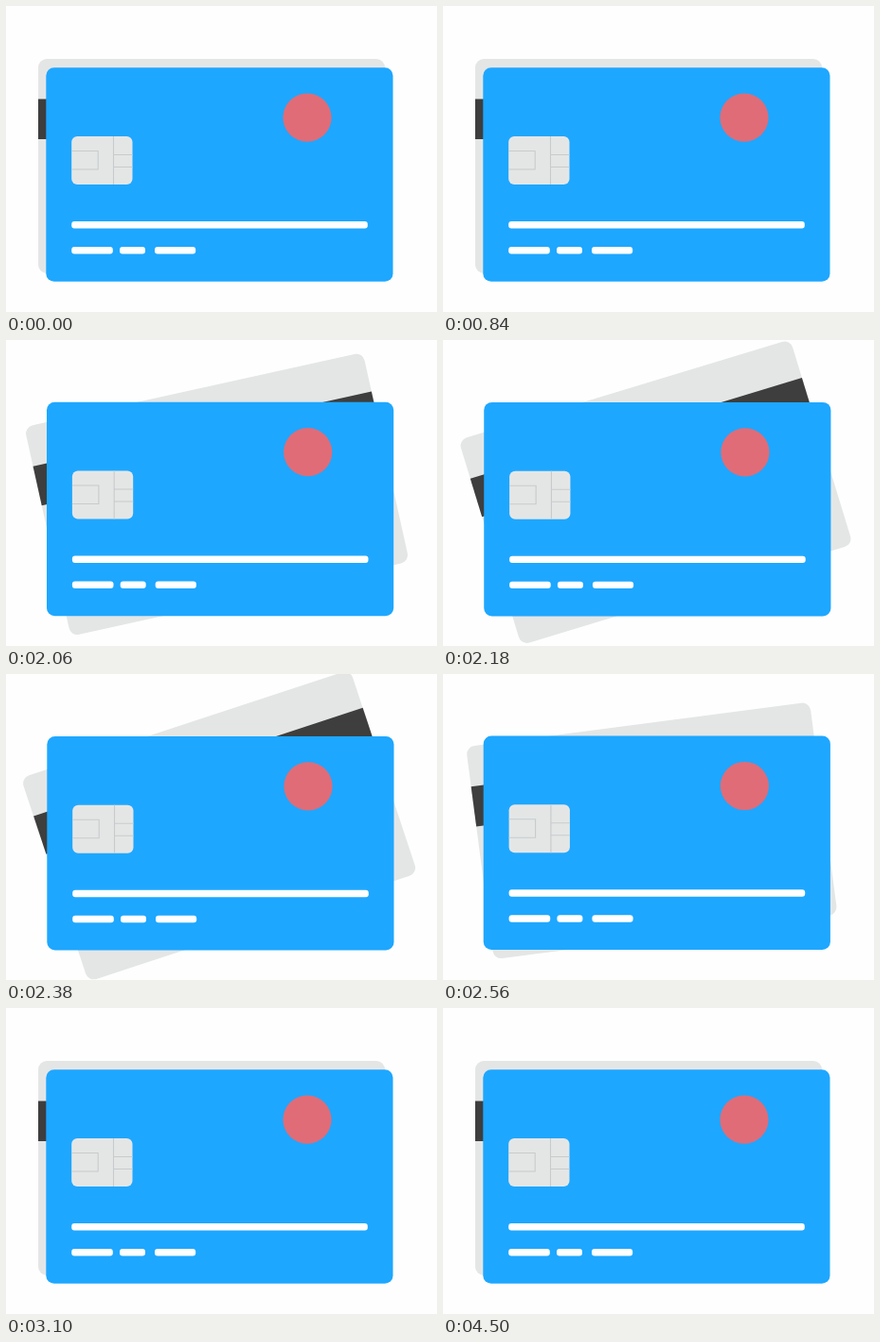
Recreate the animation shown at these times as an HTML page. Size 455 px wide and 324 px high, loop 4.58 s.

```html
<!DOCTYPE html>
<html lang="en">
<head>
<meta charset="utf-8">
<title>Bank cards</title>
<style>
  html, body { margin: 0; width: 100%; height: 100%; overflow: hidden; background: #fefefe; }
  svg { display: block; width: 455px; height: 324px; }
</style>
</head>
<body>
<svg viewBox="0 0 455 324">
  <g id="back">
    <rect x="34" y="56" width="366" height="227" rx="9" fill="#e4e6e6"/>
    <rect x="34" y="98.5" width="366" height="42.5" fill="#3e3e3e"/>
  </g>
  <g id="front">
    <rect x="42.3" y="65.2" width="366.2" height="226.6" rx="8.5" fill="#1ea7ff"/>
    <circle cx="318" cy="118.2" r="25.6" fill="#e06c78"/>
    <rect x="69.2" y="138" width="64.3" height="51" rx="6" fill="#e4e6e6"/>
    <path d="M113.5 138v51M113.5 157.5h20M113.5 170.5h20M69.2 153.5h28v19.5h-28" fill="none" stroke="#c8cbcb" stroke-width="1.1"/>
    <g fill="#fff">
      <rect x="69.2" y="228" width="312.6" height="7.4" rx="3"/>
      <rect x="69.2" y="255" width="43.6" height="7.4" rx="3"/>
      <rect x="120" y="255" width="27" height="7.4" rx="3"/>
      <rect x="157" y="255" width="43.2" height="7.4" rx="3"/>
    </g>
  </g>
</svg>
<script>
  const LOOP = 4580, OPEN = 1828, CLOSE = 2332, DURATION = 640;
  const back = document.getElementById('back');
  const front = document.getElementById('front');

  // cubic-bezier(.25, .1, .25, 1)
  function ease(t) {
    if (t <= 0) return 0;
    if (t >= 1) return 1;
    const curve = (s, a, b) => 3 * (1 - s) ** 2 * s * a + 3 * (1 - s) * s * s * b + s ** 3;
    let low = 0, high = 1;
    for (let i = 0; i < 24; i++) {
      const mid = (low + high) / 2;
      if (curve(mid, .25, .25) < t) low = mid; else high = mid;
    }
    return curve(low, .1, 1);
  }

  // The card turns back before it has fully opened
  function openness(t) {
    const opened = ease((Math.min(t, CLOSE) - OPEN) / DURATION);
    return opened * (1 - ease((t - CLOSE) / DURATION));
  }

  function draw(now) {
    const p = openness(now % LOOP);
    back.setAttribute('transform', `translate(${8.9 * p} ${-9.8 * p}) rotate(${-20 * p} 217 169.5)`);
    front.setAttribute('transform', `translate(${1.1 * p} ${0.8 * p})`);
  }

  let start;
  function tick(now) {
    start ??= now;
    draw(now - start);
    requestAnimationFrame(tick);
  }
  draw(0);
  requestAnimationFrame(tick);
</script>
</body>
</html>
```
